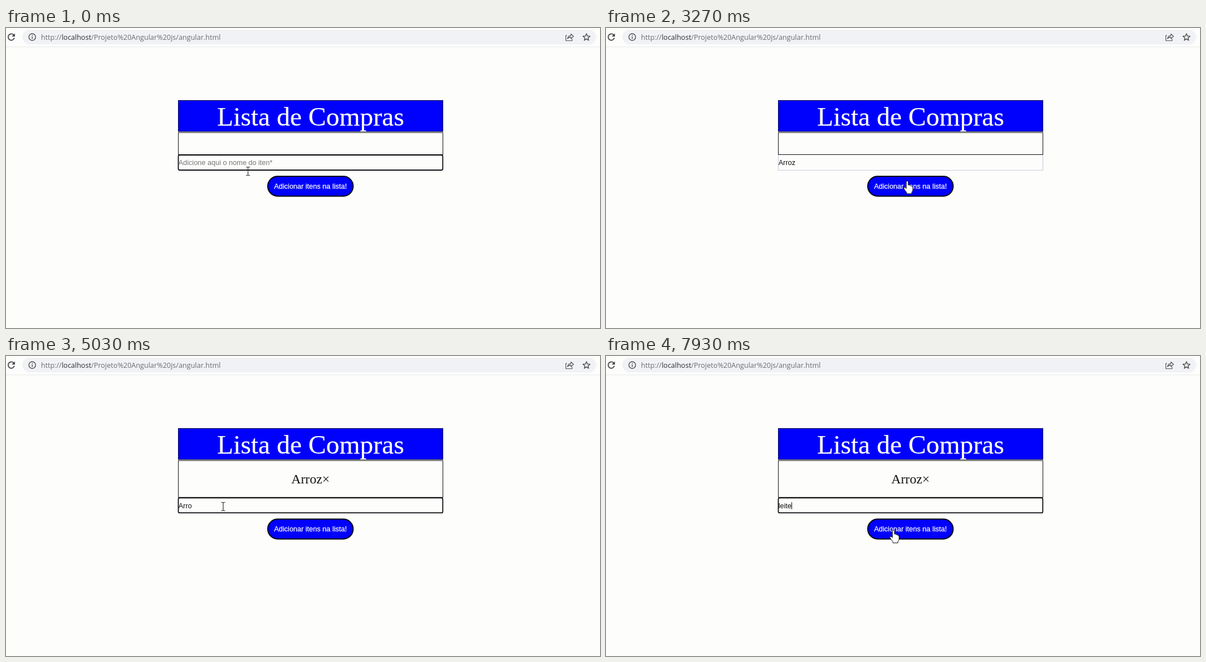
An HTML page that plays this animation: 1053 px wide and 532 px high, repeating every 8 s.

```html
<!DOCTYPE html>
<html lang="pt">
<head>
<meta charset="utf-8">
<title>Lista de Compras</title>
<style>
  html, body { margin: 0; width: 100%; height: 100%; overflow: hidden; background: #fdfdfc; }
  svg { display: block; width: 1053px; height: 532px; }
  text { white-space: pre; }
  .sans { font: 12.55px "Liberation Sans", Arial, sans-serif; }
  .serif { font-family: "Liberation Serif", "Times New Roman", serif; text-anchor: middle; }
  .url { font: 12.5px "Open Sans", "Noto Sans", sans-serif; }
  .light { fill: #fdfdfd; stroke: #fdfdfd; stroke-width: 0.25; }
  .icon { fill: none; stroke: #555; stroke-width: 1.2; stroke-linejoin: round; }
</style>
</head>
<body>
<svg viewBox="0 0 1053 532">
  <rect width="1053" height="532" fill="#fdfdfc"/>

  <!-- address bar -->
  <rect x="29" y="3" width="1017" height="26" rx="13" fill="#f1f2f5"/>
  <path d="M0 33.5H1053" stroke="#dfe2d8" stroke-dasharray="2 1"/>
  <path d="M14 12.8A5.6 5.6 0 1 0 14.8 17.6" class="icon" style="stroke:#444;stroke-width:1.8"/>
  <path d="M15.8 9.6V15.2H10.2Z" fill="#444"/>
  <circle cx="46.5" cy="16" r="6" class="icon" style="stroke-width:1.5"/>
  <path d="M46.5 15.2V19.3M46.5 12.4V14" class="icon" style="stroke-width:1.6"/>
  <text x="62" y="20.5" class="url" fill="#6a6c70">http://<tspan fill="#2a2b2e">localhost</tspan>/Projeto%20Angular%20js/angular.html</text>
  <path d="M994.5 13H992.5V22.5H1003.5V19.5M995.5 19.3Q996 13.6 1001.5 13.4V10.4L1006 14.8L1001.5 19V16.2Q997.5 16 995.5 19.3Z" class="icon"/>
  <path id="star" class="icon" style="stroke-width:1.5"/>

  <!-- heading -->
  <rect x="305.5" y="128.5" width="469" height="55" fill="#0000fd" stroke="#05053c"/>
  <text x="540" y="172.6" class="serif light" font-size="47">Lista de Compras</text>

  <!-- list -->
  <rect id="list" x="305.5" y="185.5" width="469" fill="none" stroke="#111"/>
  <text id="item" x="539.8" y="226" class="serif" font-size="23.5" fill="#111">Arroz×</text>

  <!-- form, pushed down when the list grows -->
  <g id="form">
    <path id="plain" d="M305.5 225V252.4H774.5V225" fill="none" stroke="#c9c9da"/>
    <rect id="focus" x="305.5" y="225.4" width="468.8" height="26.6" rx="2.5" fill="#fdfdfc" stroke="#101014" stroke-width="1.8"/>
    <text id="value" x="305.7" y="243.4" class="sans"></text>
    <path id="caret" d="M0 233V245.6" stroke="#111" stroke-width="1.1"/>
    <rect x="464" y="263" width="151.4" height="35.2" rx="17.6" fill="#0000fd" stroke="#05050f" stroke-width="2"/>
    <text x="475.2" y="285" class="sans light">Adicionar itens na lista!</text>
  </g>

  <!-- pointers -->
  <path id="beam" d="M-3.5 -7.5H-1.2L0 -6.6L1.2 -7.5H3.5M0 -6.6V6.6M-3.5 7.5H-1.2L0 6.6L1.2 7.5H3.5" fill="none" stroke="#333" stroke-width="1.2"/>
  <path id="hand" d="M-1.7 1.6Q-1.6 0 0 0T1.8 1.7V7Q4.4 6.2 4.9 8Q7.3 7.4 7.7 9.2Q9.8 8.9 10 11V15.5Q10 18 8 20V22.6H-1V20.5Q-3.5 17.8 -5.8 13.7Q-6.6 11.7 -5 11.2Q-3.7 11 -1.7 13.4Z" fill="#fff" stroke="#111" stroke-width="1"/>
</svg>
<script>
const LOOP = 8000;
const PLACEHOLDER = "Adicione aqui o nome do iten*";
const $ = id => document.getElementById(id);

// Stepped tracks: each entry holds until the next one.
const typed = [
  [0, ""], [500, "A"], [1130, "Ar"], [1250, "Arr"], [1500, "Arro"], [2390, "Arroz"],
  [5030, "Arro"], [5290, "Arr"], [5410, "A"], [5540, ""],
  [6170, "l"], [6420, "le"], [6550, "lei"], [6670, "leit"], [6920, "leite"]
];
const caretOn = [
  [0, 0], [500, 1], [1000, 0], [1130, 1], [2010, 0], [2390, 1], [2890, 0],
  [4280, 1], [4780, 0], [6170, 1], [7430, 0], [7930, 1]
];
const focused = [[0, 1], [3270, 0], [4280, 1]];
const added = [[0, 0], [3390, 1]];
const pointer = [
  [0, "beam", 429, 254], [2640, "beam", 446, 254], [2770, "hand", 486, 272],
  [2890, "hand", 520, 272], [3020, "hand", 534, 271.3],
  [3520, "beam", 490, 269], [3650, "beam", 417, 266], [3770, "beam", 400, 262],
  [3900, "beam", 390, 257], [4020, "beam", 387, 253], [4280, "beam", 386, 259],
  [4400, "beam", 385, 264], [4530, "beam", 385, 267],
  [7550, "beam", 398, 268], [7680, "beam", 438, 274],
  [7800, "hand", 486, 300], [7930, "hand", 509.5, 308.8]
];

const at = (track, t) => track.findLast(step => step[0] <= t).slice(1);
const show = (id, on) => $(id).setAttribute("visibility", on ? "visible" : "hidden");
const move = (id, x, y) => $(id).setAttribute("transform", `translate(${x} ${y})`);

const starPoints = Array.from({ length: 10 }, (_, i) => {
  const r = i % 2 ? 2.9 : 6.6, a = (i / 5 - 0.5) * Math.PI;
  return `${1029 + r * Math.cos(a)} ${16.6 + r * Math.sin(a)}`;
});
$("star").setAttribute("d", `M${starPoints.join("L")}Z`);

function render(t) {
  const [text] = at(typed, t), [focus] = at(focused, t), [hasItem] = at(added, t);
  const shift = hasItem ? 26.2 : 0;
  const value = $("value");

  value.textContent = text || PLACEHOLDER;
  value.setAttribute("fill", text ? "#111" : "#777");
  move("caret", 306.2 + (text ? value.getComputedTextLength() : 0), 0);
  show("caret", at(caretOn, t)[0]);
  show("focus", focus);
  show("plain", !focus);
  show("item", hasItem);
  $("list").setAttribute("height", 39 + shift);
  move("form", 0, shift);

  const [kind, x, y] = at(pointer, t);
  for (const id of ["beam", "hand"]) show(id, id === kind);
  move(kind, x, y);
}

const start = performance.now();
function tick() {
  render((performance.now() - start) % LOOP);
  requestAnimationFrame(tick);
}
tick();
</script>
</body>
</html>
```
